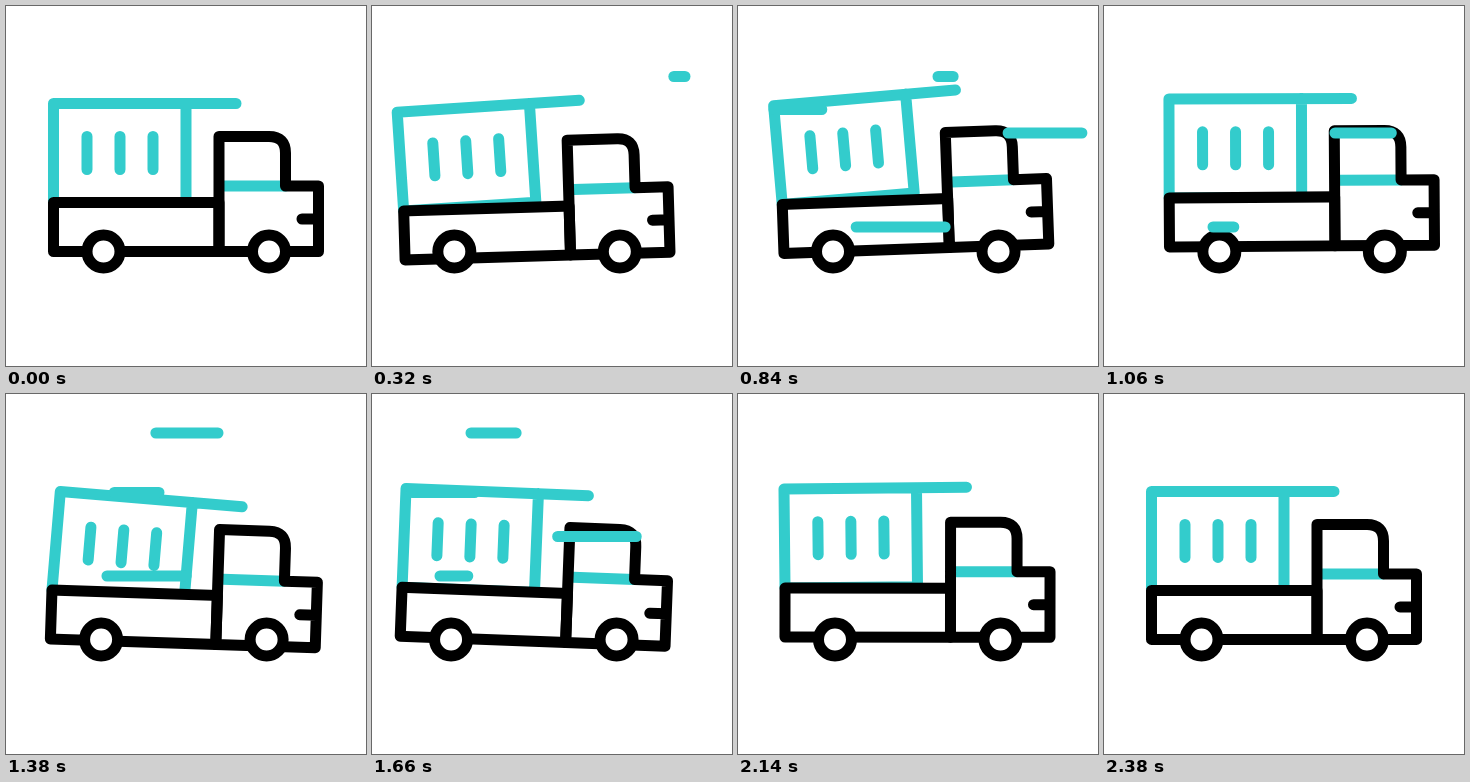
Recreate the animation shown at these times as an HTML page. Size 360 by 360 pixels, loop 2400 ms.

```html
<!DOCTYPE html>
<html lang="en">
<head>
<meta charset="utf-8">
<title>Delivery truck</title>
<style>
  html, body { margin: 0; width: 100%; height: 100%; overflow: hidden; background: #fff; }
  svg { display: block; width: 100vw; height: 100vh; }
  g { fill: none; stroke-width: 11; stroke-linecap: round; stroke-linejoin: round; }
  .teal { stroke: #33cccc; }
  .black { stroke: #000; }
  .white { fill: #fff; }
</style>
</head>
<body>
<svg viewBox="0 0 360 360">
  <g id="box" class="teal">
    <path d="M230 97.5H47.5V196.5H180V97.5M81 130.5V163.5M114 130.5V163.5M147 130.5V163.5"/>
  </g>
  <g id="body" class="black">
    <path class="teal" d="M218 180H279"/>
    <path class="white" d="M47.5 196.5H213V245.5H47.5Z"/>
    <path d="M213 245.5V130.5H263Q279.5 130.5 279.5 147V180H312.5V245.5H213M296 213H312.5"/>
  </g>
  <g id="wheels" class="black">
    <circle class="white" cx="97.5" cy="245.5" r="16.5"/>
    <circle class="white" cx="263" cy="245.5" r="16.5"/>
  </g>
  <path id="wind" class="teal" fill="none" stroke-width="11" stroke-linecap="round"/>
</svg>
<script>
const LOOP = 2400;
const TRAVEL = 113, SWEEP = 457, LAG = 265; // shared by all wind streaks

const $ = id => document.getElementById(id);
const ease = p => (1 - Math.cos(Math.PI * Math.min(1, Math.max(0, p)))) / 2;

// eased swing through a few [time, value] peaks, at rest at both ends of the loop
function swing(...peaks) {
  const keys = [[0, 0], ...peaks, [LOOP, 0]];
  return t => {
    const i = keys.findIndex(([time]) => time > t);
    const [t0, a] = keys[i - 1], [t1, b] = keys[i];
    return a + (b - a) * ease((t - t0) / (t1 - t0));
  };
}

const shift = swing([580, -26], [1080, 18], [1640, -18.5], [2200, 0]);
const lift = swing([440, 5.5], [1040, -5.5], [1480, 5.2], [1920, -4.2]);
const tilt = swing([580, -2.9], [1560, 2.3], [2200, 0]);
const boxTilt = swing([620, -7.1], [1420, 4.9], [1940, -1]);

// each streak starts at its right end: y, x, start time
const streaks = [
  [70.5, 313, 228], [103.5, 149, 325], [221, 222, 468], [127, 344, 567],
  [182, 181, 1090], [39, 212, 1138], [98.5, 153, 1183], [142.5, 265, 1372]
];

// the head runs left, the tail follows after the lag
function streak([y, x, start], t) {
  const end = delay => x - TRAVEL * ease((t - start - delay) / SWEEP);
  const head = end(0), tail = end(LAG);
  return tail - head > .2 ? `M${tail} ${y}H${head}` : "";
}

function draw(t) {
  const x = shift(t), a = tilt(t);
  const pose = `translate(${x} ${lift(t)}) rotate(${a} 180 221)`;
  $("wheels").setAttribute("transform", `translate(${x} 0)`);
  $("body").setAttribute("transform", pose);
  // the box hinges on the rear corner of the bed
  $("box").setAttribute("transform", `${pose} rotate(${boxTilt(t) - a} 47.5 196.5)`);
  $("wind").setAttribute("d", streaks.map(s => streak(s, t)).join(""));
}

const begin = performance.now();
function tick() {
  draw((performance.now() - begin) % LOOP);
  requestAnimationFrame(tick);
}
tick();
</script>
</body>
</html>
```
